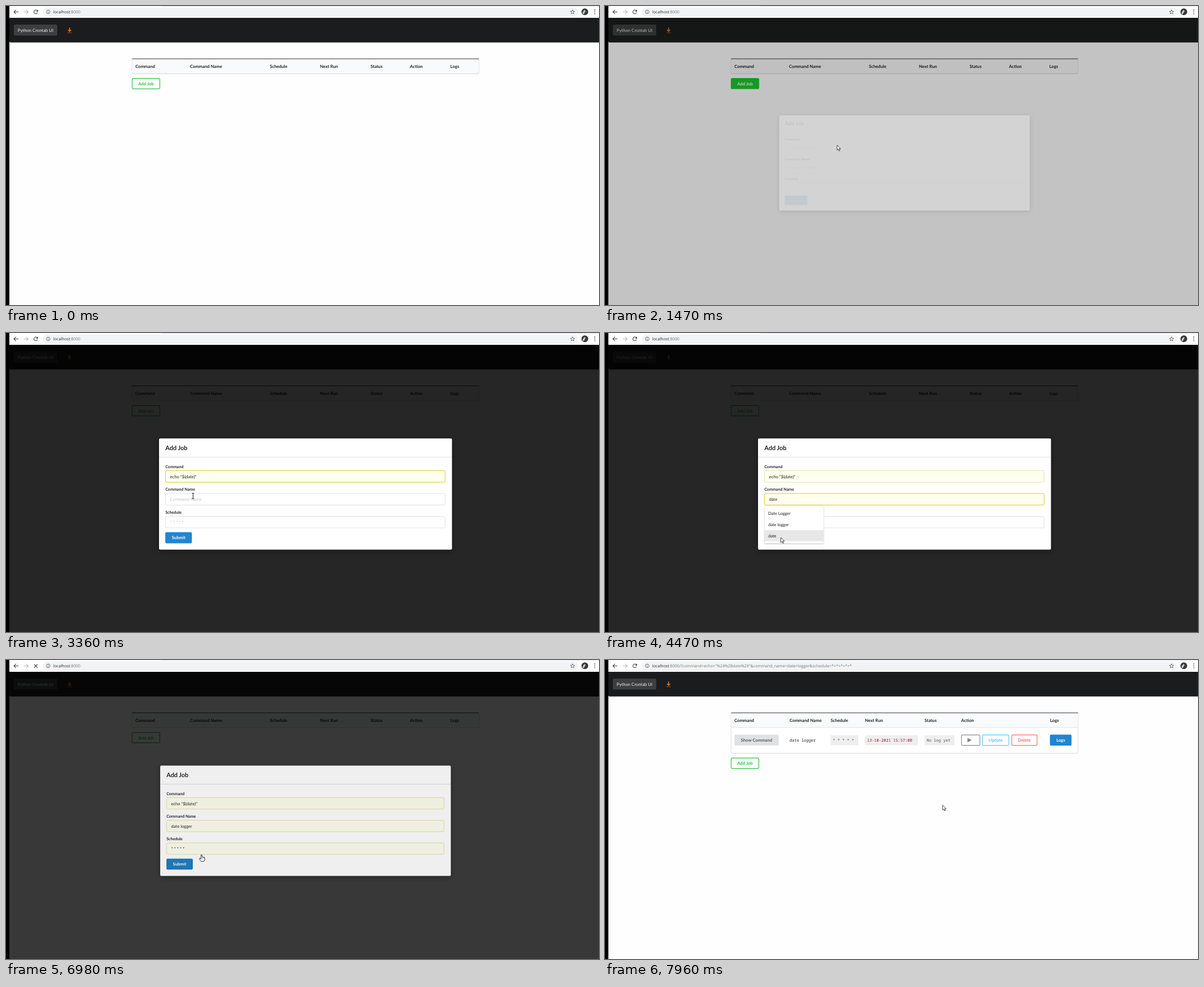
An HTML page with a canvas that plays this animation: 1054 by 531 pixels, repeating every 7.99 s.

```html
<!DOCTYPE html>
<html lang="en">
<head>
<meta charset="utf-8">
<title>Python Crontab UI</title>
<style>
html, body { margin: 0; width: 100%; height: 100%; overflow: hidden; background: #fff; }
canvas { display: block; width: 1054px; height: 531px; }
</style>
</head>
<body>
<canvas id="stage" width="1054" height="531"></canvas>
<script>
const W = 1054, H = 531, LOOP = 7990;
const screen2d = document.getElementById('stage').getContext('2d');
const layer = Object.assign(document.createElement('canvas'), { width: W, height: H });
const layer2d = layer.getContext('2d');
let g = screen2d;

const LATO = 'Lato, "Open Sans", sans-serif';
const MONO = '"Noto Sans Mono", "DejaVu Sans Mono", monospace';
const URL_FONT = '"Open Sans", "Noto Sans", sans-serif';
const INK = 'rgba(0,0,0,.87)', LINE = 'rgba(34,36,38,.15)';
const BODY = 7.69, ROW = 19.75;

// Timeline in ms
const T = { fill: 1010, open: 1410, openLen: 320, submit: 6830, close: 6945, closeLen: 400, loaded: 7670 };

const path = [
  [130, 990, 542], [510, 282, 244], [650, 282, 244], [680, 277, 241], [840, 277, 241],
  [1060, 252, 139], [1240, 253, 140], [1470, 412.5, 247], [1640, 408, 252], [2090, 360.5, 251],
  [2390, 360.5, 251], [2900, 334, 281], [3190, 334, 282], [3520, 331, 296], [4000, 331, 297],
  [4440, 312.5, 363], [4600, 312.5, 363], [4730, 318, 342], [4800, 318, 342], [5200, 332, 337],
  [5570, 332, 338], [5880, 322, 354], [6080, 322, 354], [6620, 318, 364], [6840, 318, 364],
  [6960, 347.5, 346], [7010, 347.5, 346], [7570, 566, 249], [7670, 570, 250], [7940, 600, 257.5]
];

const names = ['Date Logger', 'date logger', 'date', 'hello', 'test', 'list files'];
const commands = ['echo "$(date)"', 'echo Hello World', 'date', 'ls', 'pwd', 'echo test'];
const schedules = ['* * * * *', '@daily', '@weekly', '*/2 * * * *', 'asd', '@yearly'];

const fields = [
  { label: 'Command', hint: 'echo Hello World', y: 244.5, focus: [2400, 3600], done: 3170, value: commands[0] },
  { label: 'Command Name', hint: 'Command Name', y: 285, focus: [3600, 5290], done: 4760, value: names[1] },
  { label: 'Schedule', hint: '* * * * *', y: 325.5, focus: [5290, T.submit], done: 6060, value: schedules[0] }
];
const menus = [
  { field: 0, span: [2450, 3170], items: commands },
  { field: 1, span: [3640, 4030], items: names },
  { field: 1, span: [4030, 4760], items: names.slice(0, 3), typed: 'd' },
  { field: 2, span: [5330, 6060], items: schedules }
];

const within = (t, [a, b]) => t >= a && t < b;
const clamp = v => Math.max(0, Math.min(1, v));
const inBox = (p, x, y, w, h) => p.x >= x && p.x <= x + w && p.y >= y && p.y <= y + h;

// The CSS "ease" curve, solved by bisection
function ease(x) {
  if (x <= 0 || x >= 1) return clamp(x);
  const bez = (u, a, b) => 3 * u * (1 - u) * (1 - u) * a + 3 * u * u * (1 - u) * b + u * u * u;
  let lo = 0, hi = 1;
  for (let i = 0; i < 24; i++) {
    const mid = (lo + hi) / 2;
    if (bez(mid, .25, .25) < x) lo = mid; else hi = mid;
  }
  return bez(lo, .1, 1);
}

function pointer(t) {
  if (t < path[0][0]) return { x: -50, y: -50 };
  let i = 0;
  while (i < path.length - 1 && path[i + 1][0] <= t) i++;
  const a = path[i], b = path[i + 1] || a;
  const u = b === a ? 0 : (t - a[0]) / (b[0] - a[0]);
  const k = i === 0 ? 1 - (1 - u) ** 2 : u * u * (3 - 2 * u);
  return { x: a[1] + (b[1] - a[1]) * k, y: a[2] + (b[2] - a[2]) * k };
}

function text(s, x, cy, { size = BODY, color = INK, weight = 400, family = LATO, align = 'left' } = {}) {
  g.font = `${weight} ${size}px ${family}`;
  g.textRendering = 'geometricPrecision';
  g.textAlign = align;
  g.fillStyle = color;
  g.fillText(s, x, cy + size * .36);
  return g.measureText(s).width;
}

function box(x, y, w, h, r, fill, stroke, lw = 1) {
  g.beginPath();
  g.roundRect(x, y, w, h, r);
  if (fill) { g.fillStyle = fill; g.fill(); }
  if (stroke) { g.strokeStyle = stroke; g.lineWidth = lw; g.stroke(); }
}

function shape(points, fill, stroke, lw = 1, closed = true) {
  g.beginPath();
  points.forEach(([x, y]) => g.lineTo(x, y));
  if (closed) g.closePath();
  if (fill) { g.fillStyle = fill; g.fill(); }
  if (stroke) { g.strokeStyle = stroke; g.lineWidth = lw; g.stroke(); }
}

function disc(x, y, r, fill) {
  g.beginPath();
  g.arc(x, y, r, 0, 7);
  g.fillStyle = fill;
  g.fill();
}

function solidButton(x, y, w, label, bg, fg) {
  box(x, y, w, 19.6, 2.2, bg);
  text(label, x + w / 2, y + 9.8, { color: fg, weight: 700, align: 'center' });
}

function outlineButton(x, y, w, label, color) {
  box(x + .6, y + .6, w - 1.2, 18.5, 1.8, null, color, 1.2);
  text(label, x + w / 2, y + 9.8, { color, weight: 700, align: 'center' });
}

function arrow(x, dir, color) {
  shape([[x - 4, 10.5], [x + 4, 10.5]], null, color, 1.1, false);
  shape([[x + dir * .3, 6.8], [x + dir * 4, 10.5], [x + dir * .3, 14.2]], null, color, 1.1, false);
}

function toolbar(loading, loaded) {
  const dark = '#46494d';
  g.fillStyle = '#fff';
  g.fillRect(0, 0, W, 21);
  g.fillStyle = '#dee1e6';
  g.fillRect(276, 0, W - 276, 1);
  arrow(18, -1, dark);
  arrow(35.5, 1, '#b4b6b9');
  if (loading) {
    shape([[50, 7.3], [56.2, 13.5]], null, dark, 1.1, false);
    shape([[56.2, 7.3], [50, 13.5]], null, dark, 1.1, false);
  } else {
    g.beginPath();
    g.arc(53, 10.4, 3.3, .35, 5.5);
    g.strokeStyle = dark;
    g.lineWidth = 1.1;
    g.stroke();
    shape([[57, 6.3], [57, 10], [53.3, 10]], dark);
  }
  box(65.5, 2.8, 951.5, 15.4, 7.7, '#f1f3f4');
  g.beginPath();
  g.arc(75, 10.4, 3.3, 0, 7);
  g.strokeStyle = '#55585c';
  g.lineWidth = .8;
  g.stroke();
  g.fillStyle = '#55585c';
  g.fillRect(74.6, 10, .9, 2.3);
  g.fillRect(74.6, 8.3, .9, .9);
  const url = { size: 7.15, family: URL_FONT, color: '#26282b' };
  const w = text('localhost', 84, 10.3, url);
  const query = '/?command=echo+"%24%28date%29"&command_name=date+logger&schedule=*+*+*+*+*';
  text(':8000' + (loaded ? query : ''), 84 + w, 10.3, { ...url, color: '#75787c' });
  const star = Array.from({ length: 10 }, (_, i) => {
    const r = i % 2 ? 1.7 : 4, a = i * Math.PI / 5 - Math.PI / 2;
    return [1007 + r * Math.cos(a), 10.7 + r * Math.sin(a)];
  });
  shape(star, null, '#55585c', .8);
  disc(1028.8, 10.3, 6, '#3a3b3d');
  g.beginPath();
  g.ellipse(1027.3, 10.8, 1.7, 3.8, .5, 0, 7);
  g.fillStyle = '#c9c9c9';
  g.fill();
  [7, 10.4, 13.8].forEach(y => disc(1046.5, y, .9, dark));
}

function nav() {
  box(6, 21, W - 6, 43.8, [0, 0, 0, 2.2], '#1b1c1d');
  box(14, 33, 77, 19.5, 1.6, '#3d3e3f');
  text('Python Crontab UI', 20.8, 42.8, { color: 'rgba(255,255,255,.92)' });
  g.fillStyle = '#d9731a';
  g.fillRect(112.2, 38.3, 1.7, 4.5);
  shape([[109.4, 42.3], [116.7, 42.3], [113, 46.2]], '#d9731a');
  g.fillStyle = '#63391a';
  g.fillRect(109.2, 46.4, 7.8, 2);
}

function table(heads, height) {
  box(224, 93.8, 616.8, height, 2.2, '#fff', 'rgba(34,36,38,.18)', .9);
  box(224.4, 94, 616, 26, [2, 2, height > 30 ? 0 : 2, height > 30 ? 0 : 2], '#f9fafb');
  g.fillStyle = 'rgba(34,36,38,.13)';
  g.fillRect(224, 119.4, 617, .9);
  box(223.6, 93, 617.6, 1.5, [1.5, 1.5, 0, 0], '#767676');
  heads.forEach(([s, x]) => text(s, x, 107.3, { weight: 700 }));
}

function emptyPage(fill) {
  table([['Command', 230], ['Command Name', 327], ['Schedule', 469], ['Next Run', 558],
    ['Status', 648], ['Action', 718], ['Logs', 789.7]], 26.2);
  if (fill) solidButton(223.6, 128, 50.4, 'Add Job', fill, '#fff');
  else outlineButton(223.6, 128, 50.4, 'Add Job', '#2cc243');
}

function code(s, x, w, color) {
  box(x, 133.6, w, 18, 1, '#eee');
  text(s, x + 3.7, 142.5, { size: 7.05, family: MONO, color });
}

function jobPage() {
  table([['Command', 230], ['Command Name', 328], ['Schedule', 401], ['Next Run', 462],
    ['Status', 568], ['Action', 633], ['Logs', 791]], 71.8);
  solidButton(230, 132.5, 78.8, 'Show Command', '#e0e1e2', 'rgba(0,0,0,.6)');
  text('date logger', 328, 142.5, { size: 7.05, family: MONO });
  code('* * * * *', 401, 49, '#555');
  code('13-10-2021 15:57:00', 462, 94, '#8c1a33');
  code('No log yet', 568, 53, '#555');
  outlineButton(633, 132.5, 34, '', '#8c8c8c');
  shape([[644.3, 138.4], [651.5, 142.3], [644.3, 146.2]], '#808080');
  outlineButton(670.4, 132.5, 48, 'Update', '#54c8ff');
  outlineButton(722.4, 132.5, 46.2, 'Delete', '#ff695e');
  solidButton(790.8, 132.5, 38.4, 'Logs', '#2185d0', '#fff');
  outlineButton(223.6, 173.5, 50.4, 'Add Job', '#2cc243');
}

function drawField(f, i, t, menu, hover) {
  const own = menu && menu.field === i;
  const preview = own && hover >= 0 ? menu.items[hover] : null;
  const filled = t >= f.done || preview !== null;
  const value = t >= f.done ? f.value : preview || (own && menu.typed) || '';
  const focus = within(t, f.focus);
  const edge = filled ? (focus ? '#d5c315' : '#e5dfa1') : (focus ? '#85b7d9' : LINE);
  text(f.label, 283.2, f.y - 7.3, { size: 7.13, weight: 700 });
  box(283.5, f.y, 497, 20.5, 2, filled ? '#fffff0' : '#fff', edge, .9);
  text(value || f.hint, 291.5, f.y + 10.6, { color: value ? INK : '#c3c3c3' });
}

function modal(t, p, opening, menu, hover, p0) {
  const scale = opening ? .8 + .2 * p : .9 + .1 * p;
  g = layer2d;
  g.clearRect(0, 0, W, H);
  g.save();
  // scale about a point a quarter of the way down
  g.translate(532.3, 236.5);
  g.scale(scale, scale);
  g.translate(-532.3, -236.5);
  g.shadowColor = 'rgba(0,0,0,.4)';
  g.shadowBlur = 8;
  g.shadowOffsetY = 1.6;
  box(272, 187.2, 520.7, 197.6, 2.2, '#fff');
  g.shadowColor = 'transparent';
  g.globalAlpha = opening ? p : 1;
  text('Add Job', 283.2, 204, { size: 10.98, weight: 700 });
  g.fillStyle = LINE;
  g.fillRect(272, 220, 520.7, .9);
  fields.forEach((f, i) => drawField(f, i, t, menu, hover));
  const hot = t >= T.submit || (t > 6000 && inBox(p0, 283, 354, 47.4, 19.6));
  solidButton(283.1, 353.8, 47.3, 'Submit', hot ? '#1f7bbf' : '#2185d0', '#fff');
  g.restore();
  g = screen2d;
  g.globalAlpha = p;
  g.drawImage(layer, 0, 0);
  g.globalAlpha = 1;
}

const firstRow = m => fields[m.field].y + 25.6;

function drawMenu(m, hover) {
  const top = fields[m.field].y + 22, first = firstRow(m);
  g.save();
  g.shadowColor = 'rgba(0,0,0,.3)';
  g.shadowBlur = 2;
  g.shadowOffsetY = .6;
  box(283.3, top, 105.3, first + ROW * m.items.length + 4 - top, 1.2, '#fff');
  g.restore();
  m.items.forEach((s, i) => {
    if (i === hover) {
      g.fillStyle = '#e7e7e7';
      g.fillRect(283.3, first + i * ROW, 105.3, ROW);
    }
    text(s, 290, first + (i + .5) * ROW, { size: 7.5, color: '#1c1c1c' });
  });
}

function drawCursor(p, kind) {
  g.save();
  g.translate(p.x, p.y);
  g.lineJoin = 'round';
  if (kind === 'beam') {
    shape([[0, -4.6], [0, 4.6]], null, '#222', 1, false);
    [-4.8, 4.8].forEach(y => shape([[-2, y], [2, y]], null, '#222', .9, false));
  } else {
    g.scale(.549, .549);
    if (kind === 'hand') {
      shape([[-1.5, 0], [1.5, 0], [2, 7], [5, 7], [8, 8], [10.5, 9.5], [10.5, 15], [8.5, 21],
        [-2, 21], [-7, 13], [-6.5, 10.5], [-4, 11], [-1.8, 14]], '#fff', '#222', 1.6);
      [2, 5, 8].forEach(x => shape([[x, 8], [x, 12]], null, '#222', 1, false));
    } else {
      shape([[0, 0], [0, 16.5], [3.8, 13], [6.4, 19], [9, 17.9], [6.4, 12], [11.6, 12]], '#fff', '#222', 1.5);
    }
  }
  g.restore();
}

function cursorKind(t, p, menu, hover) {
  if (within(t, [T.submit, 7020])) return 'hand';
  if (t < T.open) return inBox(p, 223.6, 128, 50.4, 19.6) ? 'hand' : 'arrow';
  if (t < 1700 || t > T.submit || hover >= 0) return 'arrow';
  if (inBox(p, 283, 354, 47.4, 19.6)) return menu ? 'arrow' : 'hand';
  return fields.some(f => inBox(p, 283.5, f.y, 497, 20.5)) ? 'beam' : 'arrow';
}

function draw(t) {
  const p = pointer(t);
  const loaded = t >= T.loaded;
  const opening = t < T.close;
  const shown = opening ? ease((t - T.open) / T.openLen) : 1 - ease((t - T.close) / T.closeLen);
  const menu = menus.find(m => within(t, m.span));
  let hover = -1;
  if (menu) {
    const row = Math.floor((p.y - firstRow(menu)) / ROW);
    if (row >= 0 && row < menu.items.length) hover = row;
  }

  g.fillStyle = '#fefefe';
  g.fillRect(0, 0, W, H);
  nav();
  if (loaded) jobPage();
  else {
    const over = inBox(p, 223.6, 128, 50.4, 19.6) && t < T.open;
    const focused = within(t, [1250, 1640]);
    emptyPage(focused ? '#1ac82f' : over && t >= T.fill ? '#22be34' : null);
  }
  if (shown > 0) {
    g.fillStyle = `rgba(0,0,0,${.85 * shown})`;
    g.fillRect(6, 21, W - 6, H - 21);
    modal(t, shown, opening, menu, hover, p);
  }
  toolbar(within(t, [6860, T.loaded]), loaded);
  g.fillStyle = '#000';
  g.fillRect(0, 0, 6, H);
  if (menu) drawMenu(menu, hover);
  drawCursor(p, cursorKind(t, p, menu, hover));
}

const start = performance.now();
function tick() {
  draw((performance.now() - start) % LOOP);
  requestAnimationFrame(tick);
}
tick();
</script>
</body>
</html>
```
